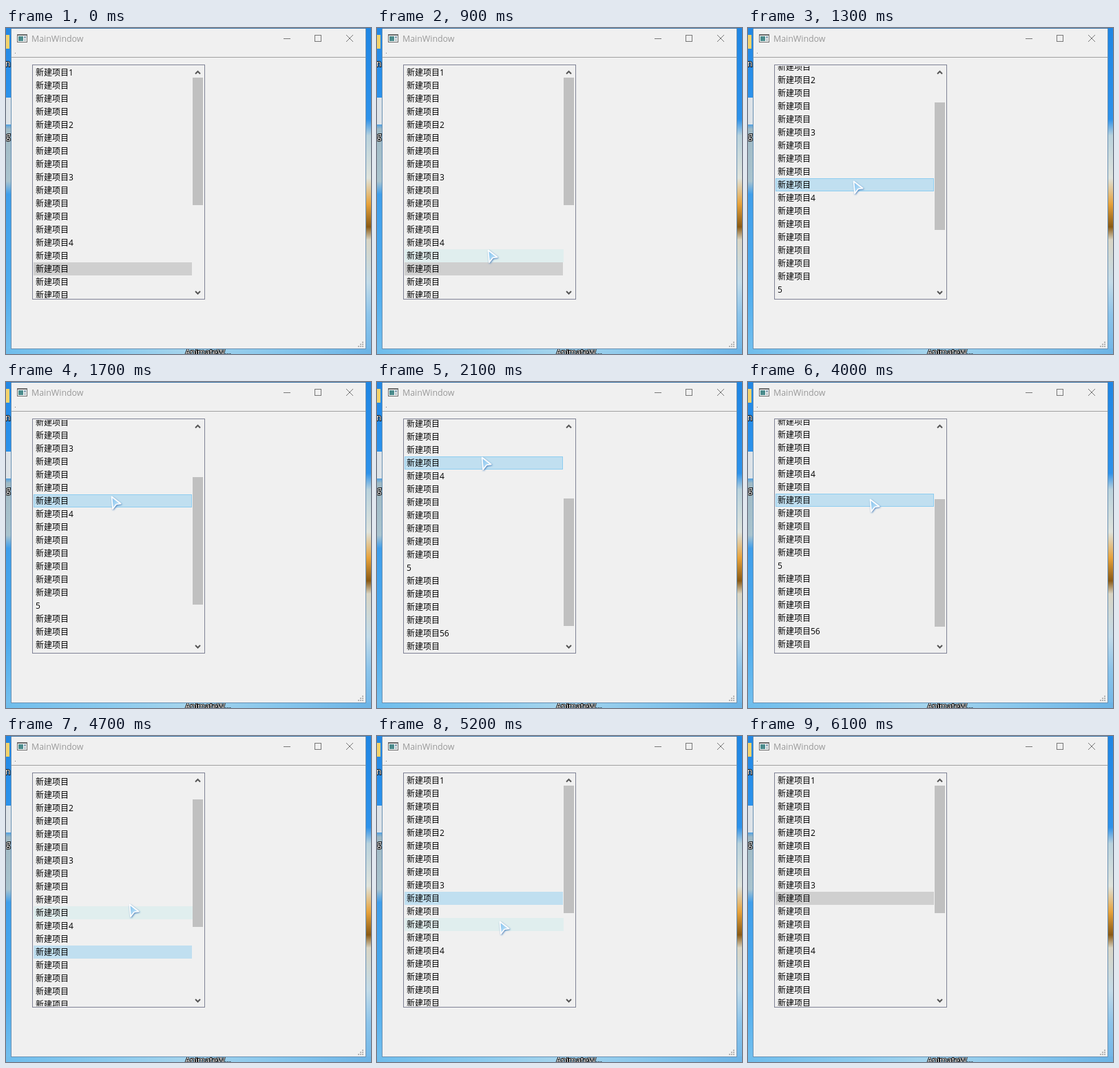
Recreate the animation shown at these times as an HTML page. Size 530 px wide and 473 px high, loop 6800 ms.

```html
<!DOCTYPE html>
<html lang="zh-CN">
<head>
<meta charset="utf-8">
<title>MainWindow</title>
<style>
  html, body { margin: 0; width: 100%; height: 100%; overflow: hidden; background: #f0f0f0; }
  svg { display: block; width: 530px; height: 473px; }
  text { font-family: "Open Sans", "Noto Sans", "Noto Sans CJK SC", "Noto Sans CJK", sans-serif; font-size: 12px; }
  .title { font-size: 12.4px; fill: #999; }
  .desk { fill: #fff; paint-order: stroke; stroke: #111; stroke-width: 2px; }
  .sharp { shape-rendering: crispEdges; }
</style>
</head>
<body>
<svg viewBox="0 0 530 473">
  <defs>
    <linearGradient id="left" x2="0" y2="1">
      <stop offset="0" stop-color="#2287e4"/>
      <stop offset=".29" stop-color="#2e96ee"/>
      <stop offset=".31" stop-color="#9fb9c4"/>
      <stop offset=".47" stop-color="#a9c3ce"/>
      <stop offset=".51" stop-color="#3f9eea"/>
      <stop offset=".8" stop-color="#4eacee"/>
      <stop offset="1" stop-color="#75c0ee"/>
    </linearGradient>
    <linearGradient id="right" x2="0" y2="1">
      <stop offset="0" stop-color="#1f86e4"/>
      <stop offset=".28" stop-color="#2d92ea"/>
      <stop offset=".33" stop-color="#b9d2dc"/>
      <stop offset=".46" stop-color="#dfe3dc"/>
      <stop offset=".54" stop-color="#e7a23a"/>
      <stop offset=".61" stop-color="#8a5a14"/>
      <stop offset=".65" stop-color="#d9d5c4"/>
      <stop offset=".78" stop-color="#c3dbe8"/>
      <stop offset=".88" stop-color="#8cc4ea"/>
      <stop offset="1" stop-color="#6fb6e8"/>
    </linearGradient>
    <linearGradient id="bottom">
      <stop offset="0" stop-color="#6fbdec"/>
      <stop offset=".3" stop-color="#8ccbee"/>
      <stop offset=".5" stop-color="#a5d4ec"/>
      <stop offset=".75" stop-color="#86c6ec"/>
      <stop offset="1" stop-color="#6cb4e6"/>
    </linearGradient>
    <linearGradient id="glass" x2="1" y2="1">
      <stop offset="0" stop-color="#7fbdec"/>
      <stop offset="1" stop-color="#d3effc"/>
    </linearGradient>
    <filter id="glow" x="-50%" y="-50%" width="200%" height="200%">
      <feDropShadow dx=".8" dy="1" stdDeviation="1" flood-color="#2f6fb4" flood-opacity=".9"/>
    </filter>
    <clipPath id="view"><rect x="40" y="55" width="231" height="337"/></clipPath>
  </defs>

  <g id="desktop">
    <rect width="8" height="473" fill="url(#left)"/>
    <rect x="522" width="8" height="473" fill="url(#right)"/>
    <rect y="465" width="530" height="8" fill="url(#bottom)"/>
    <rect y="10" width="5" height="20" fill="#f5d36b"/>
    <rect y="101" width="7" height="39" fill="#dde3e8"/>
    <text class="desk" x="-1" y="56">n</text>
    <text class="desk" x="0" y="161">g</text>
    <text class="desk" x="260" y="475">AnimateW...</text>
  </g>

  <g id="window" class="sharp">
    <rect x="7" width="516" height="466" fill="#6a91b3"/>
    <rect x="8" y="1" width="514" height="464" fill="#f0f0f0"/>
    <rect x="7" width="516" height="1" fill="#3f76a8"/>
    <rect x="8" y="42" width="514" height="1" fill="#a0a0a0"/>
    <rect x="13" y="36" width="1" height="1" fill="#777"/>
    <rect x="16.5" y="9.5" width="14" height="11" fill="#fff" stroke="#6b6b6b"/>
    <rect x="16" y="9" width="15" height="2" fill="#6b6b6b"/>
    <rect x="18" y="12" width="7" height="7" fill="#4b8b8c"/>
    <rect x="26" y="12" width="3" height="3" fill="#8fa6b8"/>
    <rect x="26" y="16" width="3" height="3" fill="#b8c3c9"/>
    <rect x="403" y="15" width="10" height="1" fill="#777"/>
    <rect x="448.500" y="10.500" width="9" height="9" fill="none" stroke="#777"/>
    <path d="M511 461h2v2h-2zm3 0h2v2h-2zm3 0h2v2h-2zm-3-3h2v2h-2zm3 0h2v2h-2zm0-3h2v2h-2z" fill="#b4b4b4"/>
    <rect x="38.500" y="53.500" width="250" height="340" fill="none" stroke="#7f8295"/>
    <rect id="thumb" x="271" y="72" width="15" height="185" fill="#c0c0c0"/>
  </g>
  <path d="M494 10l10 10m0-10l-10 10" stroke="#777" fill="none"/>
  <text class="title" x="37" y="20">MainWindow</text>
  <path d="M275 66.500l3.500-3.500 3.500 3.500M275 382l3.500 3.500 3.500-3.500" fill="none" stroke="#555" stroke-width="2"/>

  <g clip-path="url(#view)">
    <g id="list">
      <rect id="hover" class="sharp" x="40" width="231" height="19" fill="#e0eeee"/>
      <rect id="pick" class="sharp" x="40.500" width="229" height="18"/>
    </g>
  </g>

  <g id="cursor" filter="url(#glow)">
    <path d="M1.500 1.500L14.500 11.500L8 12.500L3 19Z" fill="url(#glass)" stroke="#fff" stroke-width="1.600" stroke-linejoin="round"/>
  </g>
</svg>
<script>
const LOOP = 6800, STEP = 100, ROW = 19, TOP = 55, ROWS = 29;
const $ = id => document.getElementById(id);
const labels = { 0: "新建项目1", 4: "新建项目2", 8: "新建项目3", 13: "新建项目4", 20: "5", 25: "新建项目56", 27: "新建项目88" };

// [time, scroll offset]
const scrollKeys = [[1000, 0], [1300, 65], [2100, 175], [2300, 190], [3900, 190], [4000, 178],
  [4500, 60], [4700, 36], [4900, 36], [5100, 0]];
// [time, x, y] of the pointer tip
const tipKeys = [[500, 190, 455], [1000, 153, 287], [1300, 152, 221], [2100, 151, 108], [2300, 152, 94],
  [3000, 169, 319], [3300, 172, 300], [3900, 176, 158], [4000, 176, 169], [4500, 177, 288],
  [4700, 178, 243], [4900, 177, 199], [5100, 177, 240], [5300, 177, 295], [5400, 213, 298],
  [5900, 213, 298], [6000, 300, 440]];
// [press, release, row]
const drags = [[1000, 2200, 12], [3900, 4500, 15], [4900, 5200, 9]];

for (let i = 0; i < ROWS; i++) {
  const label = document.createElementNS("http://www.w3.org/2000/svg", "text");
  label.setAttribute("x", 43);
  label.setAttribute("y", TOP + i * ROW + 14);
  label.textContent = labels[i] || "新建项目";
  $("list").append(label);
}

function at(keys, t, col) {
  if (t <= keys[0][0]) return keys[0][col];
  const n = keys.findIndex(k => k[0] > t);
  if (n < 0) return keys[keys.length - 1][col];
  const a = keys[n - 1], b = keys[n];
  return Math.round(a[col] + (b[col] - a[col]) * (t - a[0]) / (b[0] - a[0]));
}

const show = (el, on) => el.setAttribute("visibility", on ? "visible" : "hidden");

function draw(t) {
  const scroll = at(scrollKeys, t, 1);
  const x = at(tipKeys, t, 1), y = at(tipKeys, t, 2);
  const pointer = t >= 500 && t < 6100;
  const active = t >= 1000 && t < 6100;
  const pressed = drags.filter(d => t >= d[0]).pop();
  const selected = pressed ? pressed[2] : 15;
  const dragging = pressed && t < pressed[1];

  // the hovered row lags one step behind the scrolling
  const inside = pointer && x >= 40 && x < 271 && y >= TOP && y < 392;
  const under = inside ? Math.floor((y + at(scrollKeys, t - STEP, 1) - TOP) / ROW) : -1;
  const over = dragging ? selected : under;

  $("list").setAttribute("transform", `translate(0 ${-scroll})`);
  $("thumb").setAttribute("y", 72 + Math.round(scroll * 0.552));

  const fill = active ? "#c0dff0" : "#cfcfcf";
  $("pick").setAttribute("y", TOP + selected * ROW + 0.5);
  $("pick").setAttribute("fill", fill);
  $("pick").setAttribute("stroke", active && over === selected ? "#8fcdf0" : fill);
  $("hover").setAttribute("y", TOP + over * ROW);
  show($("hover"), over >= 0 && over !== selected);

  $("cursor").setAttribute("transform", `translate(${x} ${y})`);
  show($("cursor"), pointer);
}

const start = performance.now();
function tick() {
  const t = (performance.now() - start) % LOOP;
  draw(Math.floor(t / STEP) * STEP);
  requestAnimationFrame(tick);
}
tick();
</script>
</body>
</html>
```
